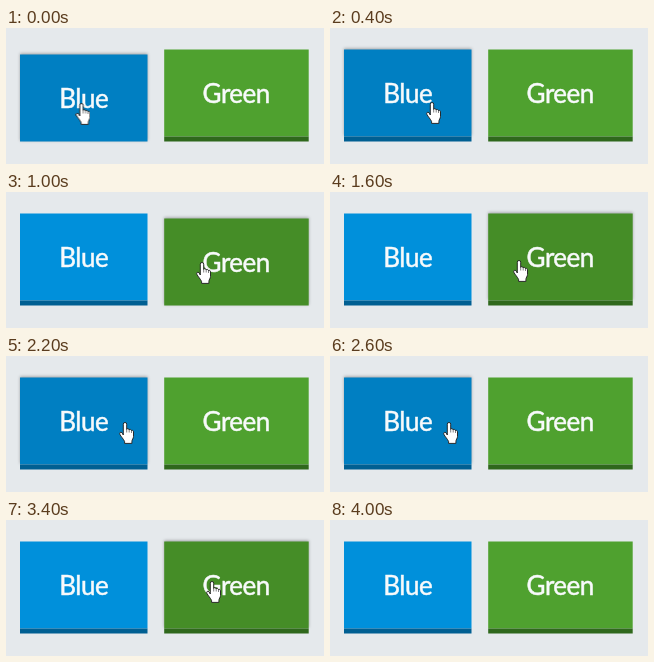
These frames come from a looping animation (318x136 px, 4.6 s). An HTML page:

```html
<!DOCTYPE html>
<html lang="en">
<head>
<meta charset="utf-8">
<title>Buttons</title>
<style>
html, body {
  margin: 0;
  width: 100%;
  height: 100%;
  overflow: hidden;
  background: #e5e9ec;
}
svg {
  display: block;
}
.button, .face, .edge, .hand, .beam {
  animation: 4.6s step-end infinite;
}
.face {
  y: 21.5px;
  height: 87px;
  fill: var(--face);
}
.edge {
  y: 108.5px;
  height: 5px;
  fill: var(--edge);
}
text {
  fill: #f8fafb;
  stroke: #f8fafb;
  stroke-width: .5px;
  font: 26px Lato, "Open Sans", sans-serif;
  letter-spacing: -.5px;
  text-anchor: middle;
}
.blue {
  --face: #0090db;
  --hot: #007fc2;
  --edge: #005f92;
  animation-name: blue-press;
}
.green {
  --face: #4fa12f;
  --hot: #458d27;
  --edge: #2f681c;
  animation-name: green-press;
}
.blue .face { animation-name: blue-hover; }
.blue .edge { animation-name: blue-edge; }
.green .face { animation-name: green-hover; }
.green .edge { animation-name: green-edge; }
.hand {
  fill: #fff;
  stroke: #222;
  stroke-width: .95px;
  stroke-linejoin: round;
  animation-name: point;
}
.beam {
  fill: none;
  stroke: #000;
  visibility: hidden;
  animation-name: beam;
}

/* One step is 200 ms, or 1/23 of the loop. */
@keyframes blue-hover {
  0%, 39.13% { fill: var(--hot); filter: drop-shadow(0 -1px 1.5px rgba(0, 0, 0, .3)); }
  13.043%, 60.869%, 100% { fill: var(--face); filter: none; }
}
@keyframes blue-press {
  0%, 52.173% { transform: translateY(5px); }
  4.347%, 56.521%, 100% { transform: none; }
}
@keyframes blue-edge {
  0%, 52.173% { visibility: hidden; }
  4.347%, 56.521%, 100% { visibility: visible; }
}
@keyframes green-hover {
  13.043%, 65.217% { fill: var(--hot); filter: drop-shadow(0 -1px 1.5px rgba(0, 0, 0, .3)); }
  0%, 39.13%, 86.956%, 100% { fill: var(--face); filter: none; }
}
@keyframes green-press {
  21.739%, 69.565%, 78.26% { transform: translateY(5px); }
  0%, 26.086%, 73.913%, 82.608%, 100% { transform: none; }
}
@keyframes green-edge {
  21.739%, 69.565%, 78.26% { visibility: hidden; }
  0%, 26.086%, 73.913%, 82.608%, 100% { visibility: visible; }
}
@keyframes point {
  0% { transform: translate(69.5px, 75px); }
  8.695% { transform: translate(96px, 74px); }
  13.043% { transform: translate(177px, 71px); }
  17.391% { transform: translate(190px, 70px); }
  34.782% { transform: translate(183px, 68px); }
  39.13% { transform: translate(121px, 67px); }
  43.478% { transform: translate(114px, 67px); }
  47.826% { transform: translate(113px, 66px); }
  60.869% { transform: translate(-40px, 0); }
  65.217% { transform: translate(200px, 61px); }
  86.956%, 100% { transform: translate(-40px, 0); }
}
@keyframes beam {
  0%, 65.217%, 100% { visibility: hidden; }
  60.869% { visibility: visible; }
}
</style>
</head>
<body>
<svg width="318" height="136" viewBox="0 0 318 136">
  <g class="button blue">
    <rect class="face" x="14" width="127.5"/>
    <rect class="edge" x="14" width="127.5"/>
    <text x="77.7" y="74.5">Blue</text>
  </g>
  <g class="button green">
    <rect class="face" x="158.2" width="144.5"/>
    <rect class="edge" x="158.2" width="144.5"/>
    <text x="230.2" y="74.5">Green</text>
  </g>
  <path class="beam" d="M148 62.5h3m1 0h3M151.5 63v14M148 77.5h3m1 0h3"/>
  <g class="hand">
    <path d="M4.3 13V2.2a1.7 1.7 0 0 1 3.4 0V7.4c.1-1.2 2.3-1 2.5.6c.2-1 2.1-.8 2.3.7c.4-.8 2-.4 2 1.2V14.5c0 2-1.6 3-1.6 5V21.4H5.6V19.6C4.6 17 2 14.8 .8 12.2C.1 10.6 1.9 9.6 3 10.8Z"/>
    <path d="M7.7 7.4V10.5M10.2 8V10.5M12.5 8.7V11" stroke-opacity=".6"/>
  </g>
</svg>
</body>
</html>
```
